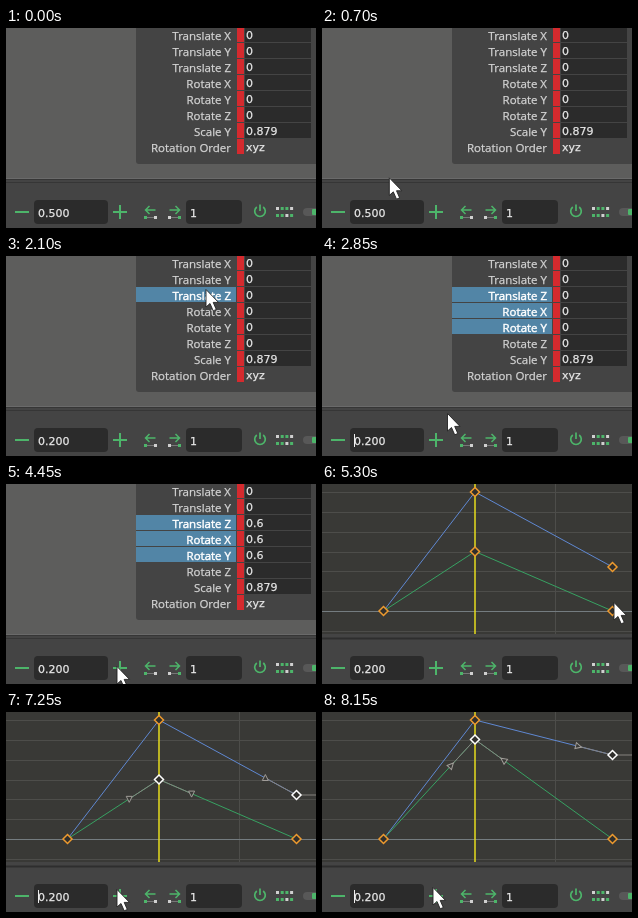
Write an HTML page that moves like this. It is 310 px wide and 200 px high and loops after 8200 ms.

```html
<!DOCTYPE html>
<html lang="en">
<head>
<meta charset="utf-8">
<title>Step value editing</title>
<style>
html, body { margin: 0; width: 100%; height: 100%; overflow: hidden; background: #444; }
svg { display: block; width: 100vw; height: 100vh; }
text { fill: #e8e8e8; stroke: #e8e8e8; stroke-width: .25px; font: 11px "DejaVu Sans", sans-serif; }
.label { font: 11.5px "Open Sans", sans-serif; text-anchor: end; fill: #d4d4d4; stroke: #d4d4d4; }
.on .label { fill: #fff; stroke: #fff; stroke-width: .45px; }
.hl { fill: #5285a6; visibility: hidden; }
.on .hl { visibility: visible; }
.field { fill: #2b2b2b; }
.green { fill: none; stroke: #4db56a; stroke-width: 2; }
.handle { fill: #393936; stroke: #a09c98; }
.key { fill: #302f2c; stroke: #ee9a2e; stroke-width: 1.5; }
.key.sel { stroke: #fff; }
</style>
</head>
<body>
<svg viewBox="0 0 310 200">
  <rect width="310" height="200" fill="#444"/>
  <g id="scene">
    <rect width="310" height="150" fill="#5d5d5c"/>
    <path d="M130 0H310V136H133Q130 136 130 133Z" fill="#444"/>
    <g id="rows"></g>
    <path d="M0 150.5H310" stroke="#6a6a6a"/>
    <path d="M0 151.5H310" stroke="#363636"/>
    <path d="M0 154.5H310" stroke="#363636"/>
  </g>
  <g id="graph">
    <rect width="310" height="150" fill="#393936"/>
    <path id="grid" stroke="#4d4d4a"/>
    <path d="M0 127.5H310" stroke="#747c80"/>
    <path id="blue" fill="none" stroke="#5f88d2"/>
    <path id="green" fill="none" stroke="#37a262"/>
    <path d="M153 0V150" stroke="#e6dc1e" stroke-width="1.5"/>
    <g id="marks"></g>
    <rect y="150" width="310" height="5" fill="#444"/>
    <path d="M0 154.5H310" stroke="#2e2e2e" stroke-width="2"/>
  </g>

  <path class="green" d="M9 184H23M107 184H121M114 177V191"/>
  <rect class="field" x="28" y="172" width="74" height="24" rx="4"/>
  <rect class="field" x="180" y="172" width="56" height="24" rx="4"/>
  <text id="step" x="32" y="189"></text>
  <rect id="caret" x="32" y="178" width="1" height="13" fill="#eee"/>
  <text x="184" y="189">1</text>
  <g id="jump">
    <path class="green" d="M149.500 182H140M143.500 178L139.500 182L143.500 186" style="stroke-width:1.500"/>
    <path d="M138 189.500H151" stroke="#777"/>
    <path d="M138 188h3v3h-3z" fill="#4db56a"/>
    <path d="M148 188h3v3h-3z" fill="#d0d0d0"/>
  </g>
  <use href="#jump" transform="matrix(-1 0 0 1 313 0)"/>
  <path class="green" d="M250.800 179A5.300 5.300 0 1 0 257.200 179M254 176.500V183" style="stroke-width:1.700"/>
  <g id="dots"></g>
  <rect x="297" y="180" width="24" height="8" rx="4" fill="#585858"/>
  <rect x="306" y="181" width="8" height="6" rx="1" fill="#4db56a"/>

  <path id="cursor" d="M0 -.5V17L4 13.500L7.200 20.800L10.300 19.500L7.200 12.400H12.500Z" fill="#fff" stroke="#222" stroke-width=".9"/>
</svg>
<script>
const LOOP = 8200, STEP = 50, CUT = 5250;
const $ = id => document.getElementById(id);

function add(parent, tag, attrs, text) {
  const el = document.createElementNS("http://www.w3.org/2000/svg", tag);
  for (const k in attrs) el.setAttribute(k, attrs[k]);
  if (text) el.textContent = text;
  return parent.appendChild(el);
}

// Channel rows
const labels = ["Translate X", "Translate Y", "Translate Z", "Rotate X", "Rotate Y", "Rotate Z", "Scale Y", "Rotation Order"];
const rows = labels.map((label, i) => {
  const g = add($("rows"), "g", {}), y = i * 16 - 1, last = i === 7;
  add(g, "rect", { class: "hl", x: 130, y, width: 100, height: 15 });
  add(g, "rect", { x: 231, y, width: 7, height: 15, fill: "#d42a2e" });
  if (!last) add(g, "rect", { class: "field", x: 239, y, width: 66, height: 15 });
  add(g, "text", { class: "label", x: 225, y: y + 13 }, label);
  const value = add(g, "text", { x: 240, y: y + 12 }, last ? "xyz" : i === 6 ? "0.879" : "0");
  return { g, value };
});

let lines = "M233.5 0V150";
for (let i = 0; i < 8; i++) lines += `M0 ${Math.round(8 + i * 19.85) + .5}H310`;
$("grid").setAttribute("d", lines);

for (let i = 0; i < 4; i++) for (let j = 0; j < 2; j++)
  add($("dots"), "rect", { x: 270 + i * 4.7, y: 179 + j * 7, width: 3, height: 3,
    fill: (i + j) % 3 ? "#4db56a" : "#d0d0d0" });

// Pointer visits: [time, x, y] stops; the last time is when it disappears
const visits = [
  [[50, 158, -12], [400, 46, 177], [450, 52, 178], [600, 52, 178], [1000, 150, 1],
   [1150, 150, 1], [1250, 85, 6], [1450, 85, 6]],
  [[1650, 290, 60], [1950, 200, 33], [2100, 200, 34], [2300, 200, 69], [2450, 200, 69], [2500, 200, 72]],
  [[2850, 125.5, 158], [3200, 111, 183], [4900, 111, 183], [5050, 150, 177]],
  [[5250, 302, 136], [5300, 292, 119], [5500, 290, 84], [5650, 290, 84], [6000, 153, 60],
   [6150, 153, 67], [6300, 153, 67], [6450, 185, 128]],
  [[6750, 170, 140], [7150, 111, 178], [7850, 111, 178], [7900, 111, 176], [8200, 111, 176]]
];

function pointer(t) {
  const path = visits.find(v => t >= v[0][0] && t < v[v.length - 1][0]);
  if (!path) return null;
  const i = path.findIndex(p => p[0] > t), a = path[i - 1], b = path[i];
  const u = (t - a[0]) / (b[0] - a[0]), e = u * u * (3 - 2 * u);
  return [a[1] + (b[1] - a[1]) * e, a[2] + (b[2] - a[2]) * e];
}

const count = (t, times) => times.filter(x => t >= x).length;

function caretOn(t) {
  if (t < 1200 || (t >= CUT && t < 6750)) return false;
  const start = t < CUT ? 1200 : 6650;
  return Math.floor((t - start) / 250) % 2 === 0;
}

function key(x, y, sel) {
  add($("marks"), "path", { class: sel ? "key sel" : "key", d: `M${x} ${y - 4.5}l4.500 4.500l-4.500 4.500l-4.500 -4.500z` });
}

// Tangent handle lying on the line from a key to its neighbour
function handle(x, y, nx, ny, turn) {
  const d = Math.hypot(nx - x, ny - y), hx = x + (nx - x) / d * 35.5, hy = y + (ny - y) / d * 35.5;
  const angle = turn ?? Math.atan2(y - hy, x - hx) * 180 / Math.PI;
  add($("marks"), "path", { d: `M${x} ${y}L${hx} ${hy}`, stroke: "#85827f" });
  add($("marks"), "path", { class: "handle", d: "M3.500 0L-2.500 -3V3Z", transform: `translate(${hx} ${hy}) rotate(${angle})` });
}

function drawGraph(t) {
  const n = count(t, [7400, 7650]), mid = 67.5 - n * 20, end = 83 - n * 20;
  const endSel = t >= 5600, midSel = t >= 6200;
  $("blue").setAttribute("d", `M61.5 127L153 8L290.5 ${end}`);
  $("green").setAttribute("d", `M61.5 127L153 ${mid}L290.5 127`);
  $("marks").textContent = "";
  if (midSel) {
    handle(153, mid, 61.5, 127, n ? undefined : 90);
    handle(153, mid, 290.5, 127, n ? undefined : 90);
  }
  if (endSel) {
    handle(290.5, end, 153, 8, n ? undefined : -90);
    add($("marks"), "path", { d: `M290 ${end}H310`, stroke: "#85827f" });
  }
  key(61.5, 127, false);
  key(153, 8, false);
  key(290.5, 127, false);
  key(153, mid, midSel);
  key(290.5, end, endSel);
}

function drawChannels(t) {
  const picked = count(t, [2100, 2200, 2300]);
  const value = ["0", "0.2", "0.4", "0.6"][count(t, [3650, 4000, 4350])];
  for (let i = 0; i < 3; i++) {
    rows[i + 2].g.setAttribute("class", i < picked ? "on" : "");
    rows[i + 2].value.textContent = value;
  }
}

function show(el, on) { el.style.display = on ? "" : "none"; }

function draw(t) {
  const inGraph = t >= CUT, p = pointer(t);
  show($("scene"), !inGraph);
  show($("graph"), inGraph);
  if (inGraph) drawGraph(t); else drawChannels(t);
  $("step").textContent = t < 1200 ? "0.500" : "0.200";
  show($("caret"), caretOn(t));
  show($("cursor"), p);
  if (p) $("cursor").setAttribute("transform", `translate(${p[0]} ${p[1]})`);
}

const began = performance.now();
let shown = -1;
function tick() {
  const t = Math.floor((performance.now() - began) % LOOP / STEP) * STEP;
  if (t !== shown) draw(shown = t);
  requestAnimationFrame(tick);
}
tick();
</script>
</body>
</html>
```
